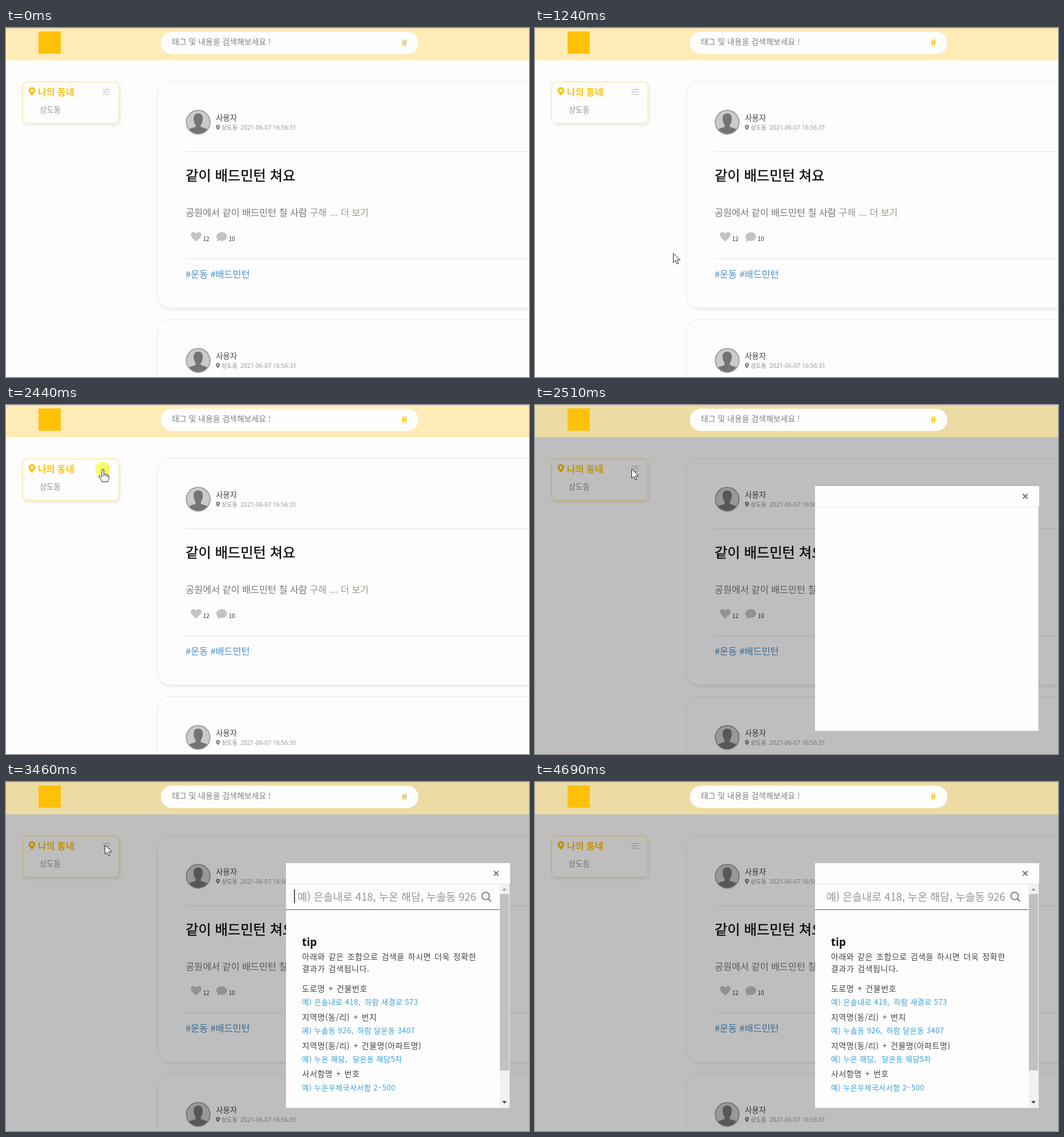
An HTML page for the animation above (5.18 s loop, 917 px wide and 611 px high).

```html
<!DOCTYPE html>
<html lang="ko">
<head>
<meta charset="utf-8">
<title>동네 설정</title>
<style>
html, body { margin: 0; width: 100%; height: 100%; overflow: hidden; background: #fdfdfd; }
svg { display: block; width: 100%; height: 100%; }
text { font-family: "Noto Sans CJK KR", "Noto Sans", sans-serif; white-space: pre; }
.latin { font-family: "Noto Sans", "Noto Sans CJK KR", sans-serif; }
.light { font-weight: 300; }
.bold { font-weight: 700; }
.tip { font-size: 14px; letter-spacing: .6px; word-spacing: 1.5px; fill: #444; }
.example { font-size: 13px; letter-spacing: .5px; fill: #37a0dc; }
</style>
</head>
<body>
<svg viewBox="0 0 917 611" xmlns="http://www.w3.org/2000/svg">
  <defs>
    <filter id="shadow" x="-10%" y="-10%" width="120%" height="130%">
      <feDropShadow dx="2" dy="3" stdDeviation="2" flood-opacity=".07"/>
    </filter>
    <path id="pin" d="M6 15.5C4 12 0 9 0 6A6 6 0 0 1 12 6C12 9 8 12 6 15.5ZM6 3.6A2.4 2.4 0 1 0 6 8.4A2.4 2.4 0 1 0 6 3.6Z" fill-rule="evenodd"/>
    <clipPath id="face"><circle cx="337" cy="165" r="20.5"/></clipPath>
    <g id="post">
      <rect x="265.5" y="93.5" width="720" height="396.5" rx="22" fill="#fdfdfd" stroke="#e8e8e8" filter="url(#shadow)"/>
      <circle cx="337" cy="165" r="21" fill="#cbcbcb"/>
      <path clip-path="url(#face)" fill="#747474" d="M337 149.5C343 149.5 345.5 154 345 160C344.7 165 342.5 168 341.5 170V173C346 175 353 175.5 355 180V188H319V180C321 175.5 328 175 332.5 173V170C331.5 168 329.3 165 329 160C328.5 154 331 149.5 337 149.5Z"/>
      <circle cx="337" cy="165" r="20.8" fill="none" stroke="#999" stroke-width="1.8"/>
      <text x="368" y="162" font-size="13.4" fill="#444">사용자</text>
      <use href="#pin" transform="translate(368 169.5) scale(.6)" fill="#777"/>
      <text x="378" y="178" font-size="10.1" fill="#888">상도동</text>
      <text class="latin light" x="411" y="178" font-size="10.4" fill="#999">2021-06-07 16:56:31</text>
      <path d="M315 216.5H917M315 404H917" stroke="#e2e2e2"/>
      <text x="315" y="267" font-size="24.3" font-weight="500" fill="#111" stroke="#111" stroke-width=".5">같이 배드민턴 쳐요</text>
      <g class="light" font-size="16.3">
        <text x="315" y="329" fill="#777">공원에서 같이 배드민턴 칠 사람 <tspan fill="#999">구해</tspan></text>
        <text x="568" y="329" fill="#9f998e">...</text>
        <text x="587" y="329" font-size="16.1" fill="#9f998e">더 보기</text>
        <text x="315" y="437" fill="#4a90cc">#운동 #배드민턴</text>
      </g>
      <path fill="#c3c3c3" d="M333.5 374L326 366.5C321 361 327 354.5 332 358.5L333.5 360L335 358.5C340 354.5 346 361 341 366.5Z"/>
      <path fill="#c3c3c3" d="M378.5 357.5C384 357.5 387.5 361 387.5 365.2C387.5 369.5 384 372.7 378.5 372.7C377 372.7 375.6 372.4 374.5 372C373 373.2 371 374 369.3 374C370.3 373 371 371.5 371.2 370C365.5 364.5 371 357.5 378.5 357.5Z"/>
      <g font-size="10" fill="#333">
        <text x="345.5" y="373">12</text>
        <text x="390.5" y="373">10</text>
      </g>
    </g>
  </defs>

  <rect width="917" height="611" fill="#fdfdfd"/>
  <rect x="29" y="94.5" width="169" height="72.5" rx="8" fill="#fdfdfd" stroke="#ffebb5" stroke-width="2" filter="url(#shadow)"/>
  <use href="#pin" x="39.5" y="103.5" fill="#ffc107"/>
  <text class="bold" x="56" y="118" font-size="16.1" fill="#ffc107">나의 동네</text>
  <text x="59" y="147.5" font-size="13.4" fill="#929292">상도동</text>
  <path d="M169 107.5H182M169 111.8H182M169 116H182M177.5 105.8V109M172.5 110.2V113.4M176.5 114.5V117.5" stroke="#bbb" stroke-width="1.1"/>
  <use href="#post"/>
  <use href="#post" y="417"/>

  <rect id="dim" y="56" width="917" height="555" fill="#000" opacity=".25"/>

  <rect id="header" width="917" height="56.5"/>
  <rect width="917" height="1" fill="#d6c69c"/>
  <rect x="57" y="6" width="39" height="39" fill="#ffc107"/>
  <rect x="271.5" y="6.5" width="451.5" height="39" rx="19.5" fill="#fefefe"/>
  <text x="291" y="29" font-size="13.9" fill="#808080">태그 및 내용을 검색해보세요 !</text>
  <text class="bold" x="693.5" y="32" font-size="17" fill="#ffc107">#</text>

  <g id="modal">
    <rect x="491" y="178" width="391.5" height="392.5" fill="#fdfdfd"/>
    <rect x="491" y="142" width="393" height="36" fill="#fefefe"/>
    <path d="M491 178H884" stroke="#e4e4e4"/>
    <path d="M855.5 156L863.5 164M863.5 156L855.5 164" stroke="#777" stroke-width="2.2"/>
    <g id="guide">
      <path d="M491 223.5H865" stroke="#555"/>
      <rect x="865.5" y="178.5" width="17.5" height="392" fill="#f1f1f1"/>
      <rect x="866" y="196" width="16" height="309" fill="#c1c1c1"/>
      <path d="M870 190L874 185.5L878 190Z" fill="#a3a3a3"/>
      <path d="M870 558.5L874 563L878 558.5Z" fill="#444"/>
      <text class="latin bold" x="519" y="286.5" font-size="19" fill="#111">tip</text>
    </g>
    <g id="field">
      <text class="light" x="511" y="207.5" font-size="18.5" fill="#959595">예) 은솔내로 418, 누온 해담, 누솔동 926</text>
      <circle cx="841" cy="199.5" r="6.5" fill="none" stroke="#666" stroke-width="1.6"/>
      <path d="M845.7 204.3L850.5 209.3" stroke="#666" stroke-width="1.8"/>
    </g>
    <rect id="caret" x="505" y="188" width="1.5" height="24" fill="#222"/>
  </g>

  <circle id="click" cx="169.5" cy="112.5" r="13.5" fill="#ff0" opacity=".55"/>
  <g id="cursor" fill="#fefefe" stroke="#222" stroke-linejoin="round">
    <path id="arrow" d="M.5 .5V16.5L4.2 13L6.9 19.2L9.6 18L7 12H12.5Z"/>
    <g id="hand">
      <path d="M-1 2Q-1 .5 .8 .5T2.6 2V9Q5 7.6 6 9.6Q8.2 8.6 9 10.6Q11.2 10 11.4 12.5V15Q11.4 18 9 22.5H-.5Q-2 18 -6.3 13.8Q-6.5 11 -3.8 12L-1 14.5Z"/>
      <path d="M2.6 9V13M6 10V13.5M9 11V14" fill="none"/>
    </g>
  </g>
</svg>
<script>
const LOOP = 5180;
const el = id => document.getElementById(id);
const show = (id, on) => el(id).setAttribute('visibility', on ? 'inherit' : 'hidden');
const within = (t, from, to) => t >= from && t < to;

const lines = [
  ['tip', 519, 311, '아래와 같은 조합으로 검색을 하시면 더욱 정확한'],
  ['tip', 519, 332, '결과가 검색됩니다.'],
  ['tip', 519, 367, '도로명 + 건물번호'],
  ['example', 519, 390, '예) 은솔내로 418,'],
  ['example', 629, 390, '하람 새결로 573'],
  ['tip', 519, 417, '지역명(동/리) + 번지'],
  ['example', 519, 440, '예) 누솔동 926,'],
  ['example', 616, 440, '하람 달온동 3407'],
  ['tip', 519, 467, '지역명(동/리) + 건물명(아파트명)'],
  ['example', 519, 490, '예) 누온 해담,'],
  ['example', 608, 490, '달온동 해담5차'],
  ['tip', 519, 516, '사서함명 + 번호'],
  ['example', 519, 540, '예) 누온우체국사서함 2~500']
];
for (const [kind, x, y, content] of lines) {
  const text = document.createElementNS('http://www.w3.org/2000/svg', 'text');
  text.setAttribute('class', kind);
  text.setAttribute('x', x);
  text.setAttribute('y', y);
  text.textContent = content;
  el('guide').append(text);
}

// Pointer positions as [ms, x, y]; each holds until the next.
const track = [
  [800, 740, 591], [1010, 690, 575], [1090, 540, 515], [1170, 360, 440],
  [1240, 242, 394], [1320, 232, 340], [1400, 228, 265], [1490, 226, 210],
  [1570, 213, 180], [1650, 188, 148], [1730, 166, 125], [1810, 158, 117],
  [1890, 164, 113], [1970, 169, 112], [3460, 173, 110], [3540, 192, 112],
  [3610, 235, 115], [3690, 305, 120], [3770, 400, 129], [3850, 503, 139],
  [3920, 738, 180], [3990, 733, 176], [4160, 770, 170], [4230, 825, 165],
  [4310, 868, 163], [4620, 902, 165]
];

function render(t) {
  const dimmed = t >= 2510;
  show('dim', dimmed);
  show('modal', dimmed);
  el('header').setAttribute('fill', dimmed ? '#ecdba3' : '#ffebb5');
  show('guide', t >= 2750);
  show('field', t >= 2820);
  show('caret', within(t, 3050, 3540) || within(t, 4160, 4690));
  show('click', within(t, 2440, 2510));

  const spot = track.filter(([time]) => time <= t).pop();
  show('cursor', spot && t < 4690);
  if (spot) el('cursor').setAttribute('transform', `translate(${spot[1]} ${spot[2]})`);
  const pointing = within(t, 2120, 2510);
  show('hand', pointing);
  show('arrow', !pointing);
}

const start = performance.now();
function tick() {
  render((performance.now() - start) % LOOP);
  requestAnimationFrame(tick);
}
tick();
</script>
</body>
</html>
```
